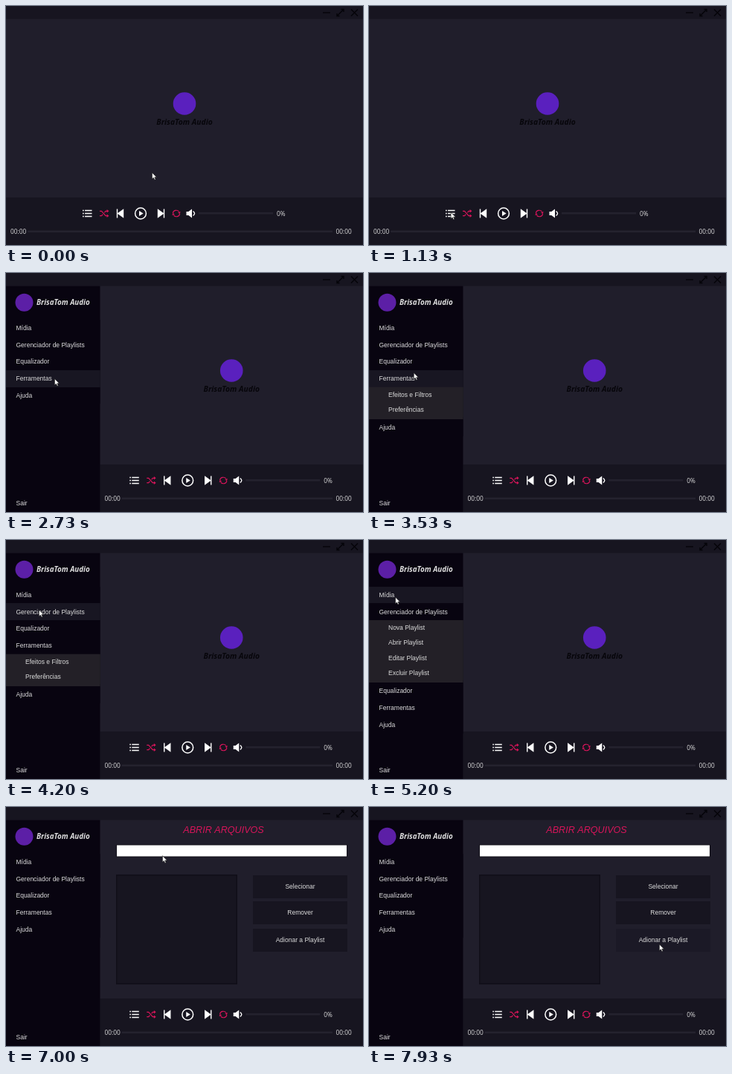
Animation of 480 by 322 pixels, one loop 8000 ms. Source, as an HTML page with a canvas:

```html
<!DOCTYPE html>
<html lang="pt">
<head>
<meta charset="utf-8">
<title>Player</title>
<style>
html, body { margin: 0; width: 480px; height: 322px; overflow: hidden; background: #201e2b; }
canvas { display: block; }
</style>
</head>
<body>
<canvas id="stage" width="480" height="322"></canvas>
<script>
const ctx = document.getElementById('stage').getContext('2d');
const LOOP = 8000, SIDE = 126.5, FPS = 15;
const BRAND = 'BrisaTom Audio';
const SANS = '"Liberation Sans", Arial, sans-serif';
const OPEN = '"Open Sans", "Noto Sans", sans-serif';
const C = {
  main: '#201e2b', panel: '#171520', side: '#080410', sub: '#232027', rowHover: '#181622',
  subHover: '#262430', btnHover: '#1b1926', track: '#24222e', text: '#dcdcdc', pink: '#d8155a'
};

const MENU = [
  ['Mídia', ['Abrir Arquivos', 'Abrir Pasta', 'Abrir Mídia Recente']],
  ['Gerenciador de Playlists', ['Nova Playlist', 'Abrir Playlist', 'Editar Playlist', 'Excluir Playlist']],
  ['Equalizador', []],
  ['Ferramentas', ['Efeitos e Filtros', 'Preferências']],
  ['Ajuda', []]
];
const BUTTONS = [['Selecionar', 92], ['Remover', 127], ['Adionar a Playlist', 164]];

// Pointer stops: time, x, y
const POINTER = [
  [0, 196, 224.5], [340, 196, 224.5], [1200, 108, 279], [1600, 108, 279],
  [2470, 65, 142.5], [2730, 65, 142.5], [3200, 62, 140], [3400, 62, 140],
  [4000, 44, 94.3], [4930, 44, 94.3], [5270, 34, 75], [5600, 34, 75],
  [6070, 33, 97.5], [6270, 35, 97], [6600, 35, 97], [7000, 210, 65.7],
  [7200, 372, 105], [7470, 396, 152], [7930, 390, 185], [LOOP, 390, 185]
];
// Which submenu is open from a given time on
const OPENINGS = [[0, -1], [2800, 3], [4330, 1], [5530, 0], [6400, -1]];
const SIDE_AT = 1270, PAGE_AT = 6400;

function pointerAt(t) {
  const i = POINTER.findIndex(p => p[0] > t);
  const [t0, x0, y0] = POINTER[i - 1], [t1, x1, y1] = POINTER[i];
  const u = (t - t0) / (t1 - t0), e = u * u * (3 - 2 * u);
  return { x: x0 + (x1 - x0) * e, y: y0 + (y1 - y0) * e };
}

function rect(x, y, w, h, color) {
  ctx.fillStyle = color;
  ctx.fillRect(x, y, w, h);
}

function label(s, x, y, { font = '8.5px ' + SANS, color = C.text, align = 'left' } = {}) {
  ctx.font = font;
  ctx.fillStyle = color;
  ctx.textAlign = align;
  ctx.fillText(s, x, y);
}

function disc(x, y, r, color) {
  ctx.fillStyle = color;
  ctx.beginPath();
  ctx.arc(x, y, r, 0, 7);
  ctx.fill();
}

function shape(d, x, y, { fill, stroke, width = 1.2 }) {
  const path = new Path2D(d);
  ctx.save();
  ctx.translate(x, y);
  if (fill) { ctx.fillStyle = fill; ctx.fill(path); }
  if (stroke) { ctx.strokeStyle = stroke; ctx.lineWidth = width; ctx.stroke(path); }
  ctx.restore();
}

const inside = (p, x, y, w, h) => p.x >= x && p.x < x + w && p.y >= y && p.y < y + h;

function drawTopBar() {
  const ink = { stroke: '#050409', width: 1.4 };
  rect(0, 0, 480, 17.5, C.panel);
  shape('M-5 0H5', 431, 9, ink);
  shape('M-4.5 4.5L4.5 -4.5M1 -4.5H4.5V-1M-4.5 1V4.5H-1', 449.5, 9, ink);
  shape('M-4.5 -4.5L4.5 4.5M-4.5 4.5L4.5 -4.5', 468.5, 9, ink);
}

function drawControls(w) {
  const x = w / 2, y = 279.5, white = { fill: '#fff' };
  const pink = { stroke: C.pink, width: 1.2 }, pinkFill = { fill: C.pink };
  const time = { font: '8.3px ' + OPEN };
  rect(w, 258, 480 - w, 64, C.panel);
  for (const dy of [-4, 0, 4]) {
    rect(x + 103, y + dy - .75, 1.7, 1.5, '#fff');
    rect(x + 106, y + dy - .75, 9.5, 1.5, '#fff');
  }
  shape('M-6 -3.2H-3.5L2 3.2H4.5M-6 3.2H-3.5L-1.8 1.2M.4 -1.2L2 -3.2H4.5', x + 132, y, pink);
  shape('M3.6 -5.4L6.4 -3.2L3.6 -1ZM3.6 1L6.4 3.2L3.6 5.4Z', x + 132, y, pinkFill);
  shape('M-4.7 -6H-3.3V-.6L4.7 -6.3V6.3L-3.3 .6V6H-4.7Z', x + 153.5, y, white);
  shape('M7.4 0A7.4 7.4 0 1 1 -7.4 0A7.4 7.4 0 1 1 7.4 0Z', x + 181, y, { stroke: '#fff', width: 1.5 });
  shape('M-2 -3.4L3.6 0L-2 3.4Z', x + 181, y, white);
  shape('M4.7 -6H3.3V-.6L-4.7 -6.3V6.3L3.3 .6V6H4.7Z', x + 208.5, y, white);
  shape('M-4.6 -.6A4.5 4.2 0 0 1 3.4 -2.6M4.6 .6A4.5 4.2 0 0 1 -3.4 2.6', x + 229, y, pink);
  shape('M5.6 -2.6L4.6 .8L2 -1.6ZM-5.6 2.6L-4.6 -.8L-2 1.6Z', x + 229, y, pinkFill);
  shape('M-6.5 -2.6H-3.6L1 -6V6L-3.6 2.6H-6.5Z', x + 249, y, white);
  shape('M2.5 -3Q6.6 0 2.5 3', x + 249, y, { stroke: '#fff', width: 1.4 });
  rect(x + 259, 278, 100, 2.5, C.track);
  label('0%', x + 364, 283, time);
  label('00:00', w + 6, 307.3, time);
  label('00:00', 443.5, 307.3, time);
  rect(w + 29, 302.5, 410 - w, 2.5, C.track);
}

function drawHome(w) {
  const x = 240 + w / 2;
  disc(x, 131.5, 15.3, '#5a20be');
  label(BRAND, x, 160, { font: 'italic bold 10.3px ' + OPEN, color: '#07060b', align: 'center' });
}

function drawPage(p) {
  label('ABRIR ARQUIVOS', 292.5, 35.3, { font: 'italic 12.6px ' + SANS, color: C.pink, align: 'center' });
  rect(148, 50.5, 311, 17, '#14121b');
  rect(149, 51.5, 309, 15, '#fff');
  rect(148, 91, 163, 148, '#100e18');
  rect(149.5, 92.5, 160, 145, C.panel);
  for (const [name, y] of BUTTONS) {
    rect(332, y, 127, 31, inside(p, 332, y, 127, 31) ? C.btnHover : C.panel);
    label(name, 395.5, y + 18.3, { align: 'center' });
  }
}

function drawSide(open, p) {
  rect(0, 17.5, SIDE, 304.5, C.side);
  disc(24.5, 39.7, 12, '#5c1fa6');
  label(BRAND, 41, 43.3, { font: 'italic bold 9.8px ' + OPEN });
  let y = 62.7;
  const row = (name, x, h, base, hover) => {
    const top = Math.round(y), tall = Math.round(y + h) - top;
    const color = inside(p, 0, top, SIDE, tall) ? hover : base;
    rect(0, top, SIDE, tall, color);
    label(name, x, y + h / 2 + 2.7);
    y += h;
  };
  MENU.forEach(([name, items], i) => {
    row(name, 13.5, 22.75, C.side, C.rowHover);
    if (i !== open) return;
    const end = y + items.length * 20.3 + 3;
    rect(0, y, SIDE, end - y, C.sub);
    items.forEach(item => row(item, 26, 20.3, C.sub, C.subHover));
    y = end;
  });
  label('Sair', 13.5, 313.2);
}

function draw(t) {
  const p = pointerAt(t), w = t < SIDE_AT ? 0 : SIDE;
  const open = OPENINGS.filter(o => o[0] <= t).pop()[1];
  rect(0, 0, 480, 322, C.main);
  drawTopBar();
  drawControls(w);
  if (t < PAGE_AT) drawHome(w); else drawPage(p);
  if (w) drawSide(open, p);
  shape('M0 0V8.6L2 6.8L3.4 9.8L4.8 9.2L3.5 6.2H6.2Z', p.x + .4, p.y, { fill: '#fff', stroke: '#111', width: .6 });
}

// Motion advances in whole steps, rounded to 10 ms
function frame(now) {
  const step = Math.floor((now % LOOP + 4) * FPS / 1000);
  draw(Math.min(Math.round(step * 100 / FPS) * 10, LOOP - 1));
  requestAnimationFrame(frame);
}
requestAnimationFrame(frame);
</script>
</body>
</html>
```
